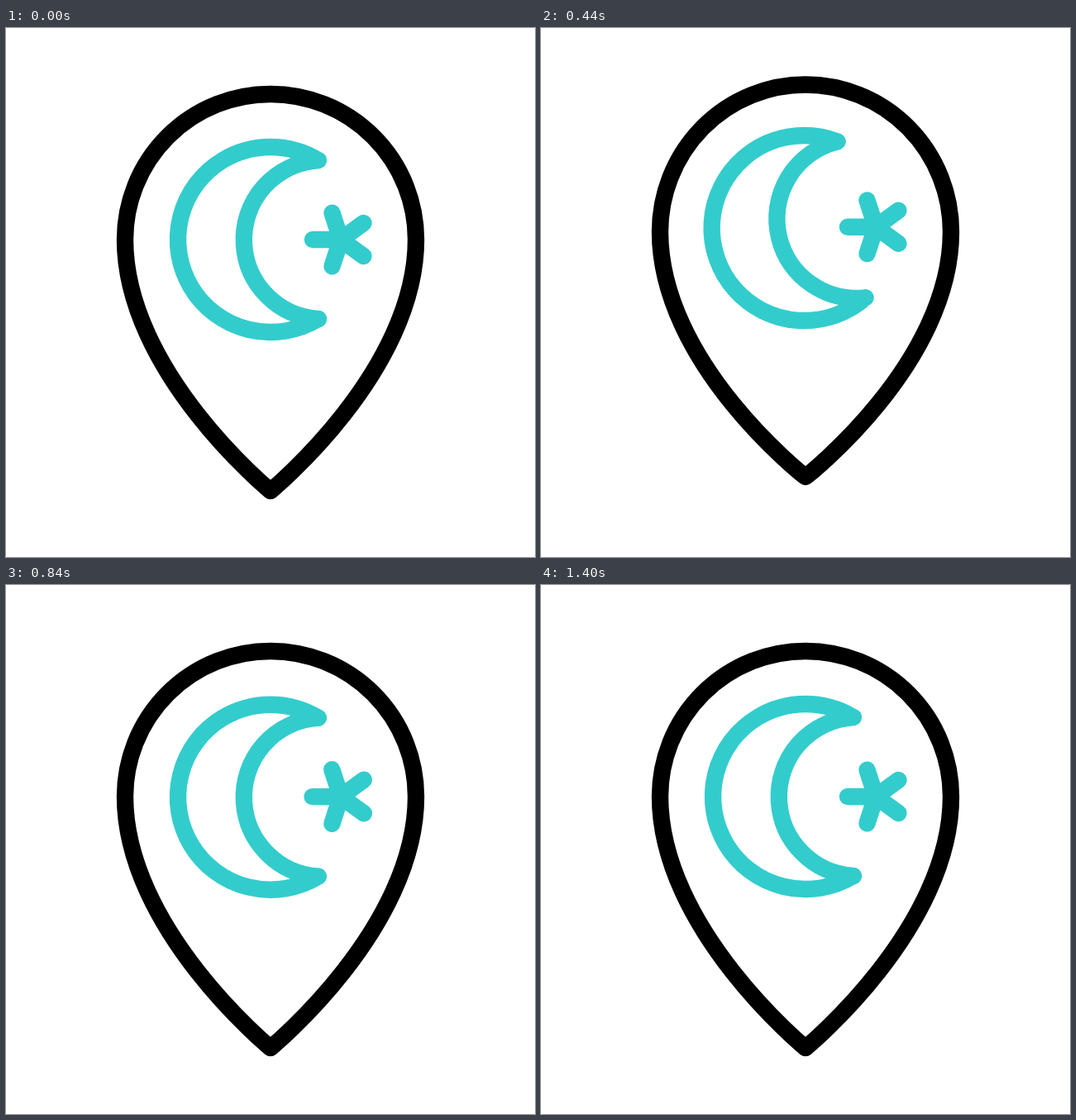
An HTML page with a canvas that plays this animation: 640 px wide and 640 px high, repeating every 1480 ms.

```html
<!DOCTYPE html>
<html lang="en">
<head>
<meta charset="utf-8">
<title>Map pin with crescent and star</title>
<style>
  html, body { margin: 0; height: 100%; overflow: hidden; background: #fff; }
  canvas { display: block; width: 100vw; height: 100vh; }
</style>
</head>
<body>
<canvas id="stage" width="640" height="640"></canvas>
<script>
const LOOP = 1480, STEP = 40;
const ctx = document.getElementById('stage').getContext('2d');
const smooth = u => u * u * (3 - 2 * u);

// Eased value at time t along [time, value] keys
function track(t, ...keys) {
  if (t <= keys[0][0]) return keys[0][1];
  for (let i = 1; i < keys.length; i++) {
    const [t0, a] = keys[i - 1], [t1, b] = keys[i];
    if (t < t1) return a + (b - a) * smooth((t - t0) / (t1 - t0));
  }
  return keys[keys.length - 1][1];
}

// Rise, squash, settle
const jump = (t, high, low) => track(t, [80, 0], [320, high], [560, low], [800, 0]);

function drawPin(topShift, sideShift, tipShift) {
  const top = 80 + topShift, side = 256 + sideShift, tip = 560 + tipShift;
  ctx.strokeStyle = '#000';
  ctx.beginPath();
  ctx.moveTo(320, tip);
  ctx.bezierCurveTo(320, tip, 144, side + 160, 144, side);
  ctx.ellipse(320, side, 176, side - top, 0, Math.PI, 0);
  ctx.bezierCurveTo(496, side + 160, 320, tip, 320, tip);
  ctx.closePath();
  ctx.stroke();
}

function drawMoon(y, tilt) {
  const outer = Math.atan2(96, 58), inner = Math.atan2(96, -6);
  ctx.save();
  ctx.translate(230, 256 + y);
  ctx.rotate(-tilt * Math.PI / 180);
  ctx.beginPath();
  ctx.arc(90, 0, 112, outer, -outer);
  ctx.arc(154, 0, 96.2, -inner, inner, true);
  ctx.closePath();
  ctx.stroke();
  ctx.restore();
}

function drawStar(y, pulse) {
  const radius = 34 * (1 + 0.26 * pulse), turn = -0.04 * pulse;
  ctx.beginPath();
  for (let i = 0; i < 5; i++) {
    const angle = Math.PI * (1 + i * 0.4) + turn;
    ctx.moveTo(405, 256 + y);
    ctx.lineTo(405 + radius * Math.cos(angle), 256 + y + radius * Math.sin(angle));
  }
  ctx.stroke();
}

function draw(t) {
  const tilt = 12.4 * track(t, [80, 0], [320, 1], [800, 0]) ** 1.15;
  const pulse = track(t, [800, 0], [1080, 1], [1360, 0]);
  ctx.fillStyle = '#fff';
  ctx.fillRect(0, 0, 640, 640);
  ctx.lineWidth = 20.4;
  ctx.lineCap = ctx.lineJoin = 'round';
  drawPin(jump(t, -51, 28), jump(t, -51, 32), jump(t, -34, 0));
  ctx.strokeStyle = '#3cc';
  drawMoon(jump(t, -54, 58) + 12.4 * pulse, tilt);
  drawStar(jump(t, -81.5, 51), pulse);
}

const start = performance.now();
function tick() {
  const t = (performance.now() - start) % LOOP;
  draw(Math.floor(t / STEP) * STEP);
  requestAnimationFrame(tick);
}
tick();
</script>
</body>
</html>
```
